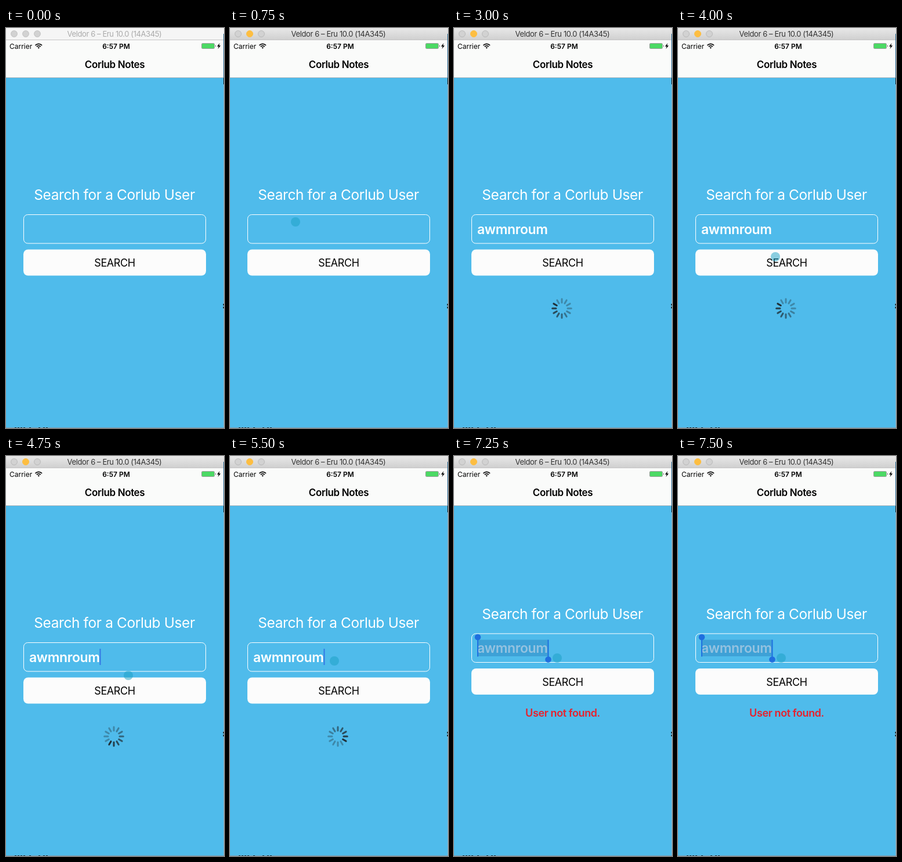
Write an HTML page that moves like this. It is 376x689 px and loops after 8 s.

```html
<!DOCTYPE html>
<html lang="en">
<head>
<meta charset="utf-8">
<style>
  html, body { margin: 0; width: 100%; height: 100%; overflow: hidden; background: #4fbbeb; }
  svg { display: block; width: 376px; height: 689px; font-family: Inter, Roboto, sans-serif; letter-spacing: -.025em; }
  .mid { text-anchor: middle; }
  .semi { font-weight: 600; }
  .status { font-size: 12px; letter-spacing: 0; }
  .white { fill: #fff; }
  .handle { fill: #1f6fdf; }
</style>
</head>
<body>
<svg viewBox="0 0 376 689">
  <defs>
    <linearGradient id="chrome" x2="0" y2="1">
      <stop stop-color="#e8e8e8"/><stop offset="1" stop-color="#d0d0d0"/>
    </linearGradient>
  </defs>

  <!-- window bar -->
  <rect id="bar" width="376" height="20"/>
  <rect y="20" width="376" height="1" fill="#c4c4c4"/>
  <g stroke="#0002" fill="#d2d2d2">
    <circle cx="14" cy="10" r="5.5"/>
    <circle id="minimise" cx="34" cy="10" r="5.5"/>
    <circle cx="54" cy="10" r="5.5"/>
  </g>
  <text id="title" class="mid" x="187" y="15" font-size="13">Veldor 6 – Eru 10.0 (14A345)</text>

  <!-- status and navigation bars -->
  <rect y="21" width="376" height="64" fill="#fafbfa"/>
  <rect y="85" width="376" height="1" fill="#b0b8bc"/>
  <text class="status" x="6" y="35.500">Carrier</text>
  <g fill="none" stroke="#000" stroke-width="1.700">
    <path d="M50.500 29.800Q56.300 24.800 62.100 29.800M52.800 32.200Q56.300 29.200 59.800 32.200"/>
    <path d="M56.300 35.800L54.500 33.600Q56.300 32.200 58.100 33.600Z" fill="#000" stroke="none"/>
  </g>
  <text class="status semi mid" x="190" y="35.500">6:57 PM</text>
  <rect x="337.500" y="26.500" width="22" height="9" rx="1.500" fill="none" stroke="#777" stroke-width=".7"/>
  <rect x="338" y="27" width="21" height="8" rx="1" fill="#4cd964"/>
  <path d="M361 29v4q1.500-2 0-4"/>
  <path d="M368.500 26l-4.500 5.700h2.800l-1.300 4.300 4.700-5.800h-2.800z"/>
  <text class="semi mid" x="187.500" y="69" font-size="17">Corlub Notes</text>

  <!-- window edges -->
  <path d="M375 86h1v603h-1z" fill="#86b8d0"/>
  <path d="M375 10h1v76h-1z" fill="#2a6a94"/>
  <path d="M375 86h1v11h-1zM374.500 475h1.500v3h-1.500zM374.500 480h1.500v3h-1.500z" fill="#222"/>
  <path d="M0 688h376v1H0z" fill="#7c9fb4"/>
  <path d="M15 688.500h18M40 688.500h4M56 688.500h4M64 688.500h9" stroke="#222" stroke-dasharray="3 2"/>

  <g id="form">
    <text class="mid white" x="187" y="296" font-size="24.500">Search for a Corlub User</text>
    <rect x="30.500" y="321.500" width="314" height="49.500" rx="7" fill="none" stroke="#fff"/>
    <text id="entry" class="semi white" x="40" y="354.700" font-size="23"></text>
    <rect id="caret" y="332" width="2" height="28" fill="#3478e5"/>
    <g id="selection">
      <rect id="shade" x="41" y="332" height="28.500" fill="#1e70b0" opacity=".35"/>
      <path class="handle" d="M40 328h2v33h-2z"/>
      <circle class="handle" cx="41" cy="327.500" r="5.300"/>
      <g id="end" class="handle"><path d="M-1 332h2v33h-2z"/><circle cy="366" r="5.300"/></g>
    </g>
    <rect x="30" y="381.500" width="315" height="45" rx="8" fill="#fcfcfc"/>
    <text class="mid" x="187.500" y="411" font-size="18">SEARCH</text>
  </g>
  <text id="error" class="semi mid" x="187.500" y="448.500" font-size="18" fill="#e8202c">User not found.</text>
  <g id="spinner" stroke="#1c2226" stroke-width="3" stroke-linecap="round"></g>
  <circle id="dot" r="8" fill="#19a0c3" fill-opacity=".5"/>
</svg>
<script>
const $ = id => document.getElementById(id);
const LOOP = 8000, STEP = 250, NAME = 'awmnroum';

// Touch positions as [start, x, y]; a start alone hides the dot.
const touches = [
  [0], [500, 113, 334], [2000], [2500, 113, 438], [2750, 113, 404], [3000],
  [3750, 118, 404], [4000, 168, 394], [4250, 211, 394], [4500, 211, 378],
  [5000, 196, 364], [5250, 180, 353], [6250, 240, 270], [6500, 174, 369],
  [6750], [7000, 178, 348]
];

for (let i = 0; i < 12; i++) {
  $('spinner').insertAdjacentHTML('beforeend',
    `<path d="M0-10V-16.3" transform="translate(186 483) rotate(${i * 30})"/>`);
}
const spokes = [...$('spinner').children];

const show = (id, on) => $(id).setAttribute('visibility', on ? 'visible' : 'hidden');
const set = (id, attrs) => Object.entries(attrs).forEach(([k, v]) => $(id).setAttribute(k, v));

function caretOn(t) {
  if (t < 1000 || t >= 7250) return false;
  if (t < 2500) return true;
  if (t >= 5500 && t < 6250) return true;
  return t % 1000 >= 500;
}

function draw(time) {
  const t = Math.floor(time % LOOP / STEP) * STEP;
  const active = t >= 750, found = t >= 5750, selected = t >= 7250;

  set('bar', { fill: active ? 'url(#chrome)' : '#f5f5f5' });
  set('minimise', active ? { fill: '#fdbe41', stroke: '#fdbe41' } : { fill: '#d2d2d2', stroke: '#0002' });
  set('title', { fill: active ? '#333' : '#aaa' });
  set('form', { transform: `translate(0 ${found ? -15.5 : 0})` });

  const text = t < 1750 ? '' : t < 2000 ? NAME.slice(0, 2) : NAME;
  if ($('entry').textContent !== text) $('entry').textContent = text;
  set('entry', { 'fill-opacity': selected ? .75 : 1 });
  const right = 40 + (text ? $('entry').getComputedTextLength() : 0);
  set('caret', { x: right });
  show('caret', caretOn(t));
  set('shade', { width: Math.max(0, right - 40) });
  set('end', { transform: `translate(${right + 1} 0)` });
  show('selection', selected);

  show('error', found);
  show('spinner', t >= 2750 && !found);
  const lead = 10 + t * 12 / 1000;
  spokes.forEach((spoke, i) => {
    const age = ((lead - i) % 12 + 12) % 12;
    spoke.setAttribute('opacity', Math.max(.33, .9 - age * .085));
  });

  const [, x, y] = touches.findLast(p => p[0] <= t);
  show('dot', x);
  if (x) set('dot', { cx: x, cy: y });
}

const start = performance.now();
function tick() {
  draw(performance.now() - start);
  requestAnimationFrame(tick);
}
tick();
</script>
</body>
</html>
```
